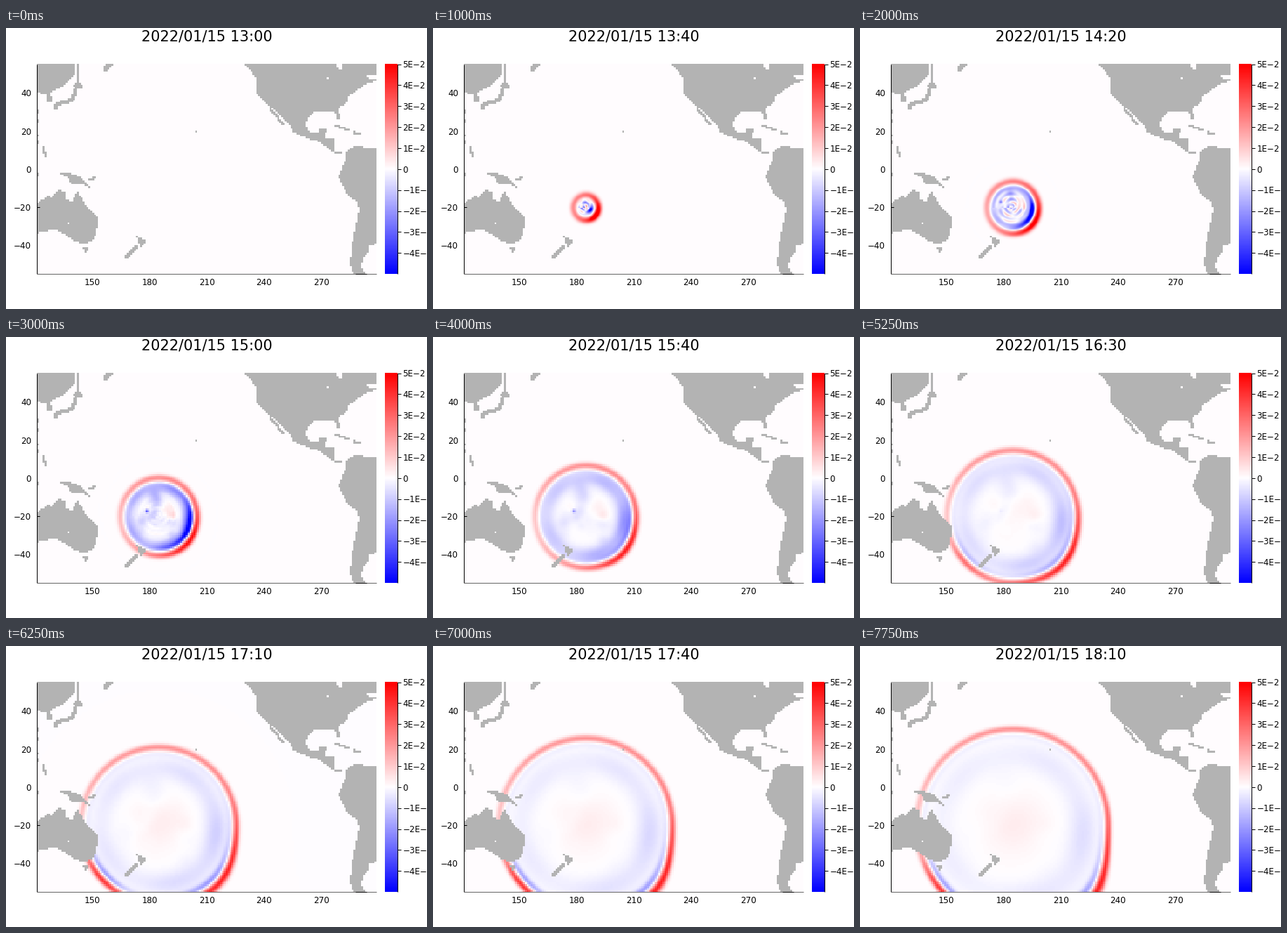
A matplotlib script for the animation above (8000 ms loop, 600 px wide and 400 px high).

```python
import numpy as np
import matplotlib.pyplot as plt
from matplotlib.animation import FuncAnimation
from matplotlib.colors import LinearSegmentedColormap
from matplotlib.path import Path

W, H, DPI = 600, 400, 100
FRAMES, STEP_MS = 32, 250
LEFT, RIGHT, TOP, BOTTOM = 44, 528, 51.6, 350.2
COLS, ROWS = 178, 110
LON0, LAT0 = 121, 55
PX_LON, PX_LAT = (RIGHT - LEFT) / COLS, (BOTTOM - TOP) / ROWS
CX, CY = 218.0, 256.0

plt.rcParams["font.family"] = "DejaVu Sans"

# Key points of the coasts as (longitude, latitude)
ASIA = [(120, 56), (141.6, 56), (140.5, 48.5), (136, 44), (129.8, 41),
        (127.8, 39.5), (129.4, 35), (126.4, 34.5), (125.5, 39), (120, 40)]
NORTH_AMERICA = [
    (229, 56), (300, 56), (300, 49.5), (294, 49.3), (295, 47), (300, 46.5),
    (293, 44.2), (290, 42), (284.5, 38), (284, 35), (279, 31.5), (280, 26),
    (279, 25.3), (277, 29.7), (266, 29.7), (262.6, 26.5), (262.3, 22),
    (264.5, 18.5), (268.5, 18.8), (269.7, 21), (273, 21.3), (271.7, 16),
    (276.7, 15.5), (276.6, 9.6), (283, 8), (276, 8.6), (270, 13.7),
    (262, 16.3), (255, 19.5), (254, 22.5), (245, 31.6), (242.8, 32.5),
    (238, 37), (236, 40), (236, 47.5)]
SOUTH_AMERICA = [
    (282.6, 7.5), (285, 11), (288.5, 11.8), (300, 10.8), (300, -38.6),
    (295, -40.5), (295, -43), (292.5, -46), (291, -51), (294, -56),
    (287, -56), (285, -50), (286.5, -38), (289.8, -22), (289, -17.5),
    (284, -14), (279, -4), (282.5, 4)]
AUSTRALIA = [
    (120, -19.4), (126.5, -14), (129, -14.8), (132, -11.2), (136.5, -12),
    (135.7, -15), (139.5, -17.5), (142.2, -11), (146.3, -19), (150.8, -23.3),
    (153, -26), (152.4, -32.5), (149.8, -38.3), (144.5, -39), (140, -37.5),
    (136, -34.8), (131, -31.6), (120, -34)]
NEW_GUINEA = [(131, -1.5), (138, -2), (144.5, -4.5), (150, -10.2),
              (144.5, -8), (139, -8.3), (137.5, -5)]
NORTH_ISLAND = [(172.8, -34.6), (178.5, -37.9), (175.2, -41.7), (174.3, -38.6)]

LON, LAT = np.meshgrid(LON0 + 0.5 + np.arange(COLS),
                       LAT0 - 0.5 - np.arange(ROWS))


def area(points):
    cells = np.column_stack([LON.ravel(), LAT.ravel()])
    return Path(points).contains_points(cells).reshape(LON.shape)


def strip(width, *points):
    """Cells within half a width of a line through the points."""
    hit = np.zeros(LON.shape, bool)
    for (ax0, ay0), (bx, by) in zip(points, points[1:] or points):
        ux, uy = bx - ax0, by - ay0
        t = ((LON - ax0) * ux + (LAT - ay0) * uy) / max(ux * ux + uy * uy, 1e-9)
        t = np.clip(t, 0, 1)
        hit |= np.hypot(LON - ax0 - t * ux, LAT - ay0 - t * uy) < width / 2
    return hit


def make_land():
    land = sum(map(area, [ASIA, NORTH_AMERICA, SOUTH_AMERICA, AUSTRALIA,
                          NEW_GUINEA, NORTH_ISLAND])).astype(bool)
    land |= strip(1.4, (142.6, 54), (142.6, 46))
    land |= strip(2.4, (141.5, 43.5), (144, 43.3))
    land |= strip(2.2, (141, 41), (140, 36.5), (136, 35), (131.5, 34), (130.8, 32))
    land |= strip(2.6, (157, 52.5), (159.3, 55))
    land |= strip(1.4, (243.5, 31.5), (249.8, 23.5))
    land |= strip(1.1, (277.5, 22.6), (284, 20.6))
    land |= strip(1.1, (287.5, 19), (290.5, 18.5))
    land |= strip(2, (173, -41.3), (168, -46))
    land |= strip(1.4, (145.5, -41.5), (147.5, -41.5), (146.5, -43))
    land |= strip(1.2, (148.5, -5.6), (151.5, -4.5))
    land |= strip(1.3, (124.3, 11), (125.5, 7))
    land |= strip(1, (204.5, 19.5))
    for lat in (30, 25, 17.5, 14, -3):
        land |= strip(2.2, (121, lat))
    lakes = (strip(1, (273.5, 47.5)) | strip(1, (137.5, -28.5))
             | strip(2.6, (279.7, 55), (279.7, 53.5)))
    return land & ~lakes


LAND = make_land()

rng = np.random.default_rng(8)
EDDIES = [(0.55 * np.sqrt(rng.random()), rng.uniform(0, 2 * np.pi),
           rng.uniform(0.05, 0.11), rng.uniform(-0.9, 0.9))
          for _ in range(18)]


def bell(d, s):
    return np.exp(-0.5 * (d / s) ** 2)


def lobe(angle, deg, k):
    return np.exp(k * (np.cos(angle - np.radians(deg)) - 1))


def wave(n, fine):
    """Sea level from -1 to 1, `fine` samples per degree."""
    x = LEFT + (np.arange(COLS * fine) + 0.5) * PX_LON / fine
    y = TOP + (np.arange(ROWS * fine) + 0.5) * PX_LAT / fine
    x, y = np.meshgrid(x, y)
    if n == 0:
        return np.zeros_like(x)
    dx, dy = x - CX, y - CY
    a = np.arctan2(dy, dx)
    # The front runs faster to the south-east
    south = np.clip(dy / 94, 0, 1) ** 2
    r = np.hypot(dx * np.where(dx > 0, 1.01 - 0.17 * south, 1), dy)
    R = 4.3 * n + 9 * (1 - np.exp(-n / 4))
    early = np.exp(-(n / 9) ** 2)
    late = np.clip((n - 16) / 9, 0, 1)
    inside = 1 / (1 + np.exp(np.clip((r - R + 11) / 1.5, -40, 40)))

    crest = (0.42 + 0.45 * lobe(a, 38, 4) + 0.55 * early * lobe(a, 15, 1)
             - 0.22 * (1 - early) * lobe(a, 170, 2.5)
             + 0.5 * late * lobe(a, 138, 14))
    v = crest * bell(r - (R - 5), 3.2)

    # Narrow trough right behind the crest
    trough = (0.05 + 0.9 * min(1, (11.5 / n) ** 4) * lobe(a, 22, 3)
              + 0.33 * late * (lobe(a, 48, 10) + lobe(a, 138, 14)))
    v -= trough * bell(r - (R - 14), 3.2) * inside

    # Broad trough further in
    broad = min(0.6, 0.42 * (16 / n) ** 1.9)
    v -= (broad * (0.45 + 0.55 * lobe(a, 15, 1.5))
          * (0.85 + 0.15 * np.sin(5 * a + 1))
          * bell(r - 0.71 * R, 0.1 * R) * inside)
    v += 0.07 * late * bell(r, 0.2 * R)

    ripple = 0.45 * np.exp(-(n / 9.5) ** 4)
    v += (ripple * np.cos(0.75 * r + 2 * np.sin(a + 0.6) - 0.9 * n)
          * np.sin(1.5 * a + 0.08 * r) * bell(r, 0.4 * R) * inside)

    gain = min(0.3, 1.6 * np.exp(-n / 7))
    for rad, ang, size, amp in EDDIES:
        ex, ey = rad * R * np.cos(ang), rad * R * np.sin(ang)
        v += gain * amp * bell(np.hypot(dx - ex, dy - ey), size * R) * inside

    # Disturbance left at the volcano
    v -= 0.7 * bell(n - 12, 4) * bell(np.hypot(dx + 17, dy + 8), 1.8) * inside
    return np.clip(v, -1, 1)


def picture(n):
    fine = 3 if n < 10 else 1
    land = np.kron(LAND, np.ones((fine, fine), bool))
    return np.ma.masked_array(wave(n, fine), land)


def clock(n):
    minutes = 13 * 60 + 10 * n
    return f"2022/01/15 {minutes // 60:02d}:{minutes % 60:02d}"


fig = plt.figure(figsize=(W / DPI, H / DPI), dpi=DPI, facecolor="white")
ax = fig.add_axes([0, 0, 1, 1])
cmap = LinearSegmentedColormap.from_list("sea", ["blue", "#fffdff", "red"])
cmap.set_bad("#b3b3b3")
style = dict(cmap=cmap, vmin=-1, vmax=1, interpolation="nearest", aspect="auto")
sea = ax.imshow(picture(0), extent=(LEFT, RIGHT, BOTTOM, TOP), **style)
ax.imshow(np.linspace(1, -1, 256)[:, None],
          extent=(540, 558, BOTTOM, TOP), **style)
ax.set_xlim(0, W)
ax.set_ylim(H, 0)
ax.axis("off")


def line(xs, ys, width=0.72, color="black"):
    ax.plot(xs, ys, color=color, lw=width, solid_capstyle="butt")


def label(x, y, text, ha):
    ax.text(x, y, text.replace("-", "\u2212"), ha=ha,
            va="center_baseline", fontsize=8.6)


line([44, 44], [TOP, BOTTOM])
line([44, RIGHT], [350, 350], color="#666666")
line([498, 514], [350, 350])
line([44, 48], [255, 255])
line([558, 558], [TOP, BOTTOM])

MID = (TOP + BOTTOM) / 2
for lon in range(150, 271, 30):
    label(LEFT + (lon - LON0) * PX_LON + 0.3, 361.3, str(lon), "center")
for lat in range(-40, 41, 20):
    label(36, MID - lat * PX_LAT, str(lat), "right")
for k in range(-4, 6):
    y = MID - k * (BOTTOM - TOP) / 10
    line([558, 563], [y, y])
    label(565.3, y - 0.4, f"{k}E-2" if k else "0", "left")

title = ax.text(286.3, 18, clock(0), ha="center", va="baseline", fontsize=15)


def update(n):
    sea.set_data(picture(n))
    title.set_text(clock(n))
    return sea, title


anim = FuncAnimation(fig, update, frames=FRAMES, interval=STEP_MS,
                     repeat=True, repeat_delay=0, blit=False)
plt.show()
```
